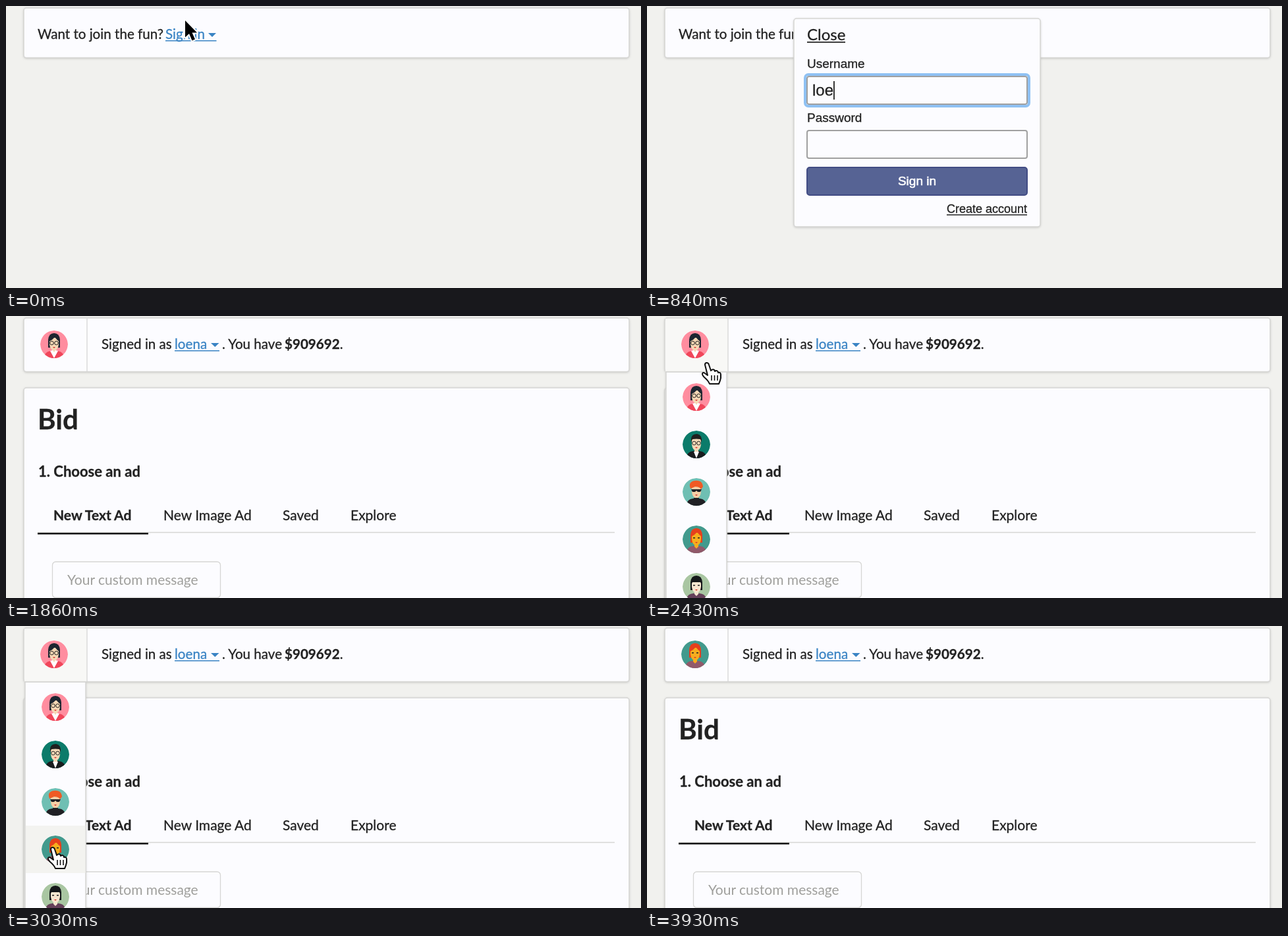
These frames come from a looping animation (964x428 px, 3.96 s). An HTML page:

```html
<!DOCTYPE html>
<html lang="en">
<head>
<meta charset="utf-8">
<title>Sign in and pick an avatar</title>
<style>
html, body { margin: 0; width: 100%; height: 100%; overflow: hidden; background: #f1f1ee; }
svg { display: block; width: 964px; height: 428px; color: #222; }
text { font: 21px Lato, sans-serif; fill: currentColor; stroke: currentColor; stroke-width: .3; white-space: pre; }
.bold { font-weight: 700; }
.bar { font-size: 20.6px; }
.form { font: 19px "Liberation Sans", Arial, sans-serif; }
.panel { fill: #fcfcff; stroke: #d6d6d4; stroke-width: 1.5; filter: drop-shadow(0 1px 1.5px #aaaaa888); }
.field { fill: #fcfcff; stroke: #a0a0a0; stroke-width: 2; }
.glow { fill: none; stroke: #8fc1f3; stroke-width: 4; }
.link { color: #3a84c4; fill: currentColor; }
.rule { stroke: #d6d6d4; stroke-width: 1.3; }
</style>
</head>
<body>
<svg viewBox="0 0 964 428">
  <defs>
    <clipPath id="disc"><circle r="21"/></clipPath>
    <g id="avatars"></g>
  </defs>

  <g id="guest">
    <rect class="panel" x="27" y="3" width="919" height="75.5" rx="4"/>
    <text class="bar" x="48" y="50">Want to join the fun?</text>
    <text class="bar link" x="242" y="50">Sign in</text>
    <path class="link" d="M307 41h12l-6 6zM242 52h77.5v1.6h-77.5z"/>
  </g>

  <g id="popup">
    <rect class="panel" x="223" y="19" width="374" height="316" rx="4"/>
    <g id="close">
      <text x="243" y="51.5" style="font-size:24px">Close</text>
      <path d="M243 54h58v1.7h-58z" fill="currentColor"/>
    </g>
    <text class="form" x="243" y="94">Username</text>
    <rect class="field" x="243" y="107" width="334" height="42" rx="3"/>
    <text class="form" x="243" y="176">Password</text>
    <rect class="field" x="243" y="189" width="334" height="42" rx="3"/>
    <rect class="glow" id="glow" x="240" width="340" height="48" rx="5"/>
    <text class="form" id="user" x="251" y="136" style="font-size:24px"></text>
    <g id="dots" fill="#333"></g>
    <rect id="caret" width="1.8" height="28" fill="#222"/>
    <rect x="243" y="245" width="334" height="42" rx="4" fill="#566394" stroke="#424c84" stroke-width="2"/>
    <text class="form" x="410" y="272" text-anchor="middle" style="color:#fff;stroke-width:.6">Sign in</text>
    <text class="form" x="577" y="314" text-anchor="end" style="font-size:18px">Create account</text>
    <path d="M455 316.3h122v1.4h-122z" fill="#222"/>
  </g>

  <g id="member">
    <rect class="panel" x="27" y="3" width="919" height="81.5" rx="4"/>
    <rect id="cell" x="28" y="4" width="95" height="80" fill="#f8f8f6"/>
    <path class="rule" d="M123 4v80"/>
    <use id="face" transform="translate(73 43)"/>
    <text class="bar" x="145" y="50">Signed in as</text>
    <text class="bar link" id="name" x="256" y="50"></text>
    <path class="link" d="M311 41h12.5l-6.2 6zM256 52h68v1.6h-68z"/>
    <text class="bar" x="328" y="50">. You have</text>
    <text class="bar" x="423" y="50"><tspan class="bold">$909692</tspan>.</text>

    <rect class="panel" x="27" y="109" width="919" height="340" rx="4"/>
    <text class="bold" x="48" y="172" style="font-size:42px">Bid</text>
    <text class="bold" x="49" y="244" style="font-size:22px">1. Choose an ad</text>
    <text class="bold" x="72" y="310">New Text Ad</text>
    <text x="239" y="310">New Image Ad</text>
    <text x="420" y="310">Saved</text>
    <text x="523" y="310">Explore</text>
    <path class="rule" d="M48 328.5h876"/>
    <path d="M48 329h168v2.4h-168z" fill="#151515"/>
    <rect x="70.5" y="373" width="255" height="54.5" rx="5" fill="#fcfcff" class="rule"/>
    <text x="93" y="408" style="color:#9f9f9c;stroke:none">Your custom message</text>

    <g id="menu">
      <rect class="panel" x="29" y="85" width="92" height="360"/>
      <rect id="hover" x="30" width="90.5" height="72" fill="#f3f3f0"/>
      <g id="items"></g>
    </g>
  </g>

  <g id="cursor" stroke-linejoin="round">
    <path id="arrow" d="M1 2V27.5L7 22L11.5 32.5L16 30.5L11.5 20.5H19Z" stroke="#fff" stroke-width="4" paint-order="stroke"/>
    <g id="hand" fill="#fff" stroke="#111" stroke-width="2">
      <path d="M-3 3C-3-1 2-1 3 3L6 12C8 9 12 10 12 13C14 11 17 12 17 15C20 14 21 16 21 18V23Q20 28 18 32H4Q2 27-4 22C-9 17-7 13-3 16L1 19Z"/>
      <path d="M7 19v8M11.5 19v8M16 19v8" stroke-width="1.6"/>
    </g>
    <path id="beam" d="M-4-13Q0-13 0-9Q0-13 4-13M0-9V9M-4 13Q0 13 0 9Q0 13 4 13" fill="none" stroke="#111" stroke-width="1.6"/>
  </g>
</svg>
<script>
const $ = id => document.getElementById(id);
const show = (id, on) => $(id).style.display = on ? '' : 'none';
const put = (id, attrs) => { for (const k in attrs) $(id).setAttribute(k, attrs[k]); };
const USER = 'loena', LOOP = 3960;

// Moments in ms
const OPEN = 270, FOCUS = 600, TYPE = 690, PASS = 1170, SIGNED = 1710,
      WAKE = 2010, MENU = 2340, PICK = 3870;

// Each avatar: backdrop, back hair, skin, clothes, fringe, its colour, details
const shape = (d, fill) => `<path d="${d}" fill="${fill}"/>`;
const bob = 'M-9 5V-7Q-8-17 0-17Q8-17 9-7V5Z';
const fringe = 'M-8-4Q-8-16 0-16Q8-16 8-4Q4-7 1-11Q-3-6-8-4Z';
const specs = '<g fill="none" stroke="#222"><circle cx="-3.5" cy="-2" r="2.8"/><circle cx="3.5" cy="-2" r="2.8"/></g>';
const eyes = shape('M-5-3h3v1.6h-3zM2-3h3v1.6h-3z', '#222');
const lips = shape('M-2 4h4l-2 2z', '#d8322c');
const collar = shape('M-6 10L0 21L6 10L2 9L0 12L-2 9Z', '#fff');
const looks = [
  ['#ff8d9f', '#1d2530', '#f6d7b4', '#f0465a', fringe, '#1d2530', specs + lips + collar],
  ['#0b7b6a', '', '#f2d8b6', '#191c1e', 'M-8-3V-9Q-7-16 1-16Q9-15 8-3L6-8Q0-9-6-8Z', '#20201e',
    specs + lips + shape('M-4 11L0 21L4 11Z', '#fff')],
  ['#6fbfb3', '', '#f4cfa6', '#202024', 'M-9-5Q-13-15-3-17Q9-19 10-8L7-4Q5-8-2-8Z', '#f05a24',
    shape('M-8-4H8L6 0H2L0-2L-2 0H-6Z', '#202024') + lips + shape('M-4 9H4V14H-4Z', '#202024')],
  ['#429a8d', '#e6401c', '#f6ad1e', '#91596a', fringe, '#e6401c', eyes + lips],
  ['#a9c6a2', '#15181a', '#f8e6cf', '#65405a', 'M-8-3V-9Q-7-16 0-16Q7-16 8-9V-3L6-7H-6Z', '#15181a', eyes + lips]
];
$('avatars').innerHTML = looks.map(([bg, back, skin, cloth, top, hair, extra], i) =>
  `<g id="a${i}" clip-path="url(#disc)"><circle r="21" fill="${bg}"/>` +
  (back && shape(bob, back)) +
  shape('M-16 22Q-15 11-5 10H5Q15 11 16 22Z', cloth) +
  shape('M-3 5H3V11L0 14L-3 11Z', skin) +
  shape('M-7-10H7V0Q6 9 0 9Q-6 9-7 0Z', skin) +
  shape(top, hair) + extra + '</g>').join('');
$('items').innerHTML = looks.map((_, i) =>
  `<use href="#a${i}" transform="translate(75 ${123 + 72 * i})"/>`).join('');
$('dots').innerHTML = Array.from({length: 9}, (_, i) =>
  `<circle cx="${255 + 8.5 * i}" cy="209.5" r="2.7"/>`).join('');
$('name').textContent = USER;

// Cursor tip: time, x, y
const path = [
  [0, 271, 20], [240, 279, 57], [420, 279, 57], [590, 300, 127],
  [WAKE, 300, 127], [2330, 91, 71], [2550, 91, 71], [2970, 71, 336], [LOOP, 71, 336]
];
function tip(t) {
  const i = path.findIndex(p => p[0] > t), [t0, x0, y0] = path[i - 1], [t1, x1, y1] = path[i];
  const u = (t - t0) / (t1 - t0), e = u * u * (3 - 2 * u);
  return [x0 + (x1 - x0) * e, y0 + (y1 - y0) * e];
}

const typed = (t, start, gap, max) => Math.max(0, Math.min(max, Math.floor((t - start) / gap) + 1));

function drawForm(t, y) {
  const inPass = t >= PASS, n = typed(t, PASS + 30, 24, 9);
  $('user').textContent = USER.slice(0, typed(t, TYPE, 75, USER.length));
  [...$('dots').children].forEach((dot, i) => dot.style.display = i < n ? '' : 'none');
  show('glow', t >= FOCUS);
  show('caret', t >= FOCUS);
  put('glow', {y: inPass ? 186 : 104});
  put('caret', {
    x: inPass ? 249.7 + 8.5 * n : 251 + $('user').getComputedTextLength(),
    y: inPass ? 196 : 114
  });
  $('close').style.color = y < 64 ? '#1f70b8' : '';
}

function drawMember(t, x, y) {
  const open = t >= MENU && t < PICK, row = Math.floor((y - 87) / 72);
  show('cell', t >= 2250 && t < PICK && (open || x < 123));
  show('menu', open);
  show('hover', row >= 0);
  put('hover', {y: 87 + 72 * row});
  put('face', {href: t < PICK ? '#a0' : '#a3'});
}

function draw() {
  const t = performance.now() % LOOP, [x, y] = tip(t), member = t >= SIGNED;
  show('guest', !member);
  show('popup', t >= OPEN && !member);
  show('member', member);
  if (member) drawMember(t, x, y); else drawForm(t, y);

  const kind = member ? (x < 123 ? 'hand' : 'arrow')
    : t < OPEN ? (y > 28 ? 'hand' : 'arrow')
    : y < 64 ? 'hand' : y > 106 ? 'beam' : 'arrow';
  for (const k of ['arrow', 'hand', 'beam']) show(k, k === kind);
  show('cursor', t < TYPE || t >= WAKE && t < PICK);
  put('cursor', {transform: `translate(${x} ${y})`});
  requestAnimationFrame(draw);
}
draw();
</script>
</body>
</html>
```
